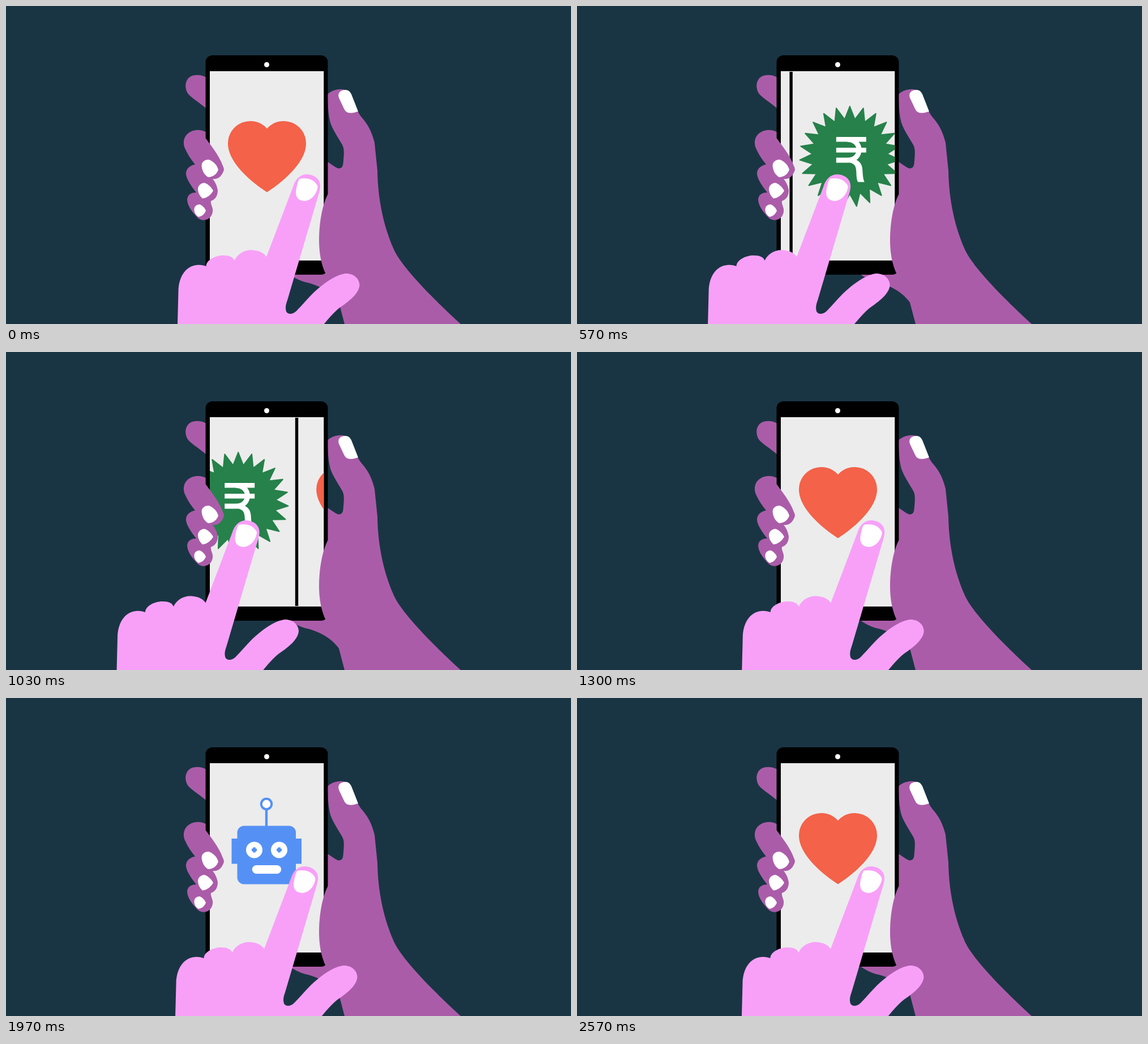
These frames come from a looping animation (998 px wide and 561 px high, 2640 ms). An HTML page:

```html
<!DOCTYPE html>
<html lang="en">
<head>
<meta charset="utf-8">
<title>Swiping a phone</title>
<style>
  html, body { margin: 0; width: 100%; height: 100%; overflow: hidden; background: #193543; }
  svg { display: block; width: 100vw; height: 100vh; }
  .skin { fill: #ab5ca9; }
  .nail { fill: #fff; }
</style>
</head>
<body>
<svg viewBox="0 0 998 561" preserveAspectRatio="none">
  <defs>
    <clipPath id="screen"><rect x="360" y="115" width="201.3" height="334"/></clipPath>

    <path id="heart" fill="#f36249" d="M461 216.2A39.5 39.5 0 0 1 530 242.5C530 274 494 307 461 328.5C428 307 392 274 392 242.5A39.5 39.5 0 0 1 461 216.2Z"/>

    <g id="rupee">
      <path id="burst" fill="#26814a" stroke="#26814a" stroke-width="2" stroke-linejoin="round"/>
      <path fill="#fff" d="M437 231H490V239.5H437ZM437 250H490V258.5H437Z"/>
      <path fill="none" stroke="#fff" stroke-width="9" d="M457 235.5C484 235.5 484 272 457 272H437"/>
      <path fill="#fff" d="M455 276C469 276 472 282 472.5 292C472.7 303 473.5 307 475.5 310.5H487C484.5 306 484 298 483.5 290C483 279 479 273 467 269Z"/>
    </g>

    <g id="robot" fill="#5591f5">
      <rect x="398.5" y="248" width="123.5" height="44.5"/>
      <rect x="408.5" y="225.5" width="103.5" height="103" rx="12"/>
      <rect x="457.8" y="195" width="4.4" height="32"/>
      <circle cx="460" cy="187" r="9.2" fill="#fff" stroke="#5591f5" stroke-width="4"/>
      <g id="eye">
        <circle cx="438.5" cy="268" r="14.5" fill="#fff"/>
        <path d="M436.2 263.5h4.6v2.2h2.2v4.6h-2.2v2.2h-4.6v-2.2h-2.2v-4.6h2.2z"/>
      </g>
      <use href="#eye" x="44"/>
      <rect x="434.7" y="295" width="51.5" height="15" rx="7.5" fill="#fff"/>
    </g>
  </defs>

  <rect width="998" height="561" fill="#193543"/>

  <!-- holding hand, behind the phone -->
  <g class="skin">
    <path d="M354 126C345 121 333 120 325 125C316 131 315 144 321 154C326 161 340 169 354 181Z"/>
    <path d="M568 156C573 150 585 146 594 147C604 148 609 154 612 162L622 187C626 195 631 199 635 205C644 217 648 230 651 241L656 290C657 345 668 390 684 427C695 455 745 508 803 561H598L588 523C572 501 547 491 528 487C518 484 510 480 500 473H540V262L568 275C575 279 580 284 587 286.5C593 287 595 283 595.5 278C597 262 598 252 594 245C586 231 577 218 573 206C569 190 569 178 568 165Z"/>
  </g>
  <path class="nail" d="M588 162C585 153 591 148 600 148C605 148 609 152 611 158L622 186C616 188 612 189 606 188.5C600 188 598 183 596 179Z"/>

  <!-- phone -->
  <rect x="352.5" y="87" width="216" height="387" rx="12"/>
  <circle cx="460.5" cy="103.5" r="4.5" fill="#fff"/>
  <g clip-path="url(#screen)">
    <rect x="360" y="115" width="202" height="334" fill="#ececec"/>
    <g id="track"></g>
  </g>

  <!-- holding hand, in front of the phone -->
  <g class="skin">
    <path d="M568.5 332C558 352 553 385 553 412C553 440 558 457 563 469L570 480H620V332Z"/>
    <path d="M352.5 222C346 218 333 217 324 223C314 229 311 242 317 253C321 262 327 271 334 279.5C326 281 319 286 318 294C317 303 327 318 336 329C328 329 321 332 320 341C320 352 329 363 336 371C341 377 347 379 353 377C362 375 366 366 365 358C364 353 361 348 362 344C370 341 374 335 374 325C372 315 369 310 365 305C372 306 379 303 383 294C385 290 386 288 383 282C376 263 362 246 352.5 233Z"/>
  </g>
  <g class="nail">
    <path d="M345.5 281C346 274 352 271 358 271C367 274 373 281 375 289C372 297 365 302 357 302C350 298 346 290 345.5 281Z"/>
    <path d="M339 322C340 315 346 312 351 312C358 315 363 320 366 326C362 333 355 339 347 339.5C342 335 339 329 339 322Z"/>
    <path d="M332.5 358C333 353 337 350 342 350C347 352 351 356 353 361C351 367 346 371 340 372C335 369 332 364 332.5 358Z"/>
  </g>

  <!-- swiping hand -->
  <g id="hand">
    <path fill="#f8a0f8" d="M303 562L304.5 503C305 478 317 459 337 457C345 456 349 458 353.5 459C353.5 448 370 440 384 440C395 440 401 443 403.5 449C408 438 421 430 434 430.5C447 431 456 436 460 442.5L507 319C511 305 520 297 532 297C547 298 556 307 555 320C554 329 550 339 547 350L497 519C494 527 493 533 495 539C498 545 507 544 513 538C523 528 531 518 541 508C556 494 577 476 599 472C613 471 624 480 624.5 492C624 505 611 517 594 529C583 536 572 549 561 562Z"/>
    <path class="nail" d="M518 305C530 302 545 305 550.5 318C550 328 542 343 527 344C516 343 512 338 512 328C513 319 515 311 518 305Z"/>
  </g>
</svg>

<script>
const LOOP = 2640, STEP = 1000 / 15, STEPS = 40;
const PAGE = 207, REACH = 119.5;
const slides = ['heart', 'rupee', 'heart', 'robot', 'heart'];

// Times in steps: finger arrives left, finger leaves left, page starts to slide
const swipes = [
  { arrive: 7.02, leave: 7.39, slide: 6 },
  { arrive: 16.81, leave: 17.05, slide: 15 },
  { arrive: 26.25, leave: 26.73, slide: 24 },
  { arrive: 35.8, leave: 36.06, slide: 33 }
];

const $ = id => document.getElementById(id);
const sine = p => (1 - Math.cos(Math.PI * p)) / 2;
const part = (t, start, span) => Math.min(1, Math.max(0, (t - start) / span));

function burstPath(points, outer, inner) {
  let d = '';
  for (let i = 0; i < points * 2; i++) {
    const a = Math.PI * i / points, r = i % 2 ? inner : outer;
    d += (i ? 'L' : 'M') + (461 + r * Math.sin(a)).toFixed(2) + ' ' + (265.5 - r * Math.cos(a)).toFixed(2);
  }
  return d + 'Z';
}

function build() {
  $('burst').setAttribute('d', burstPath(23, 88.5, 66));
  $('track').innerHTML = slides.map((name, i) =>
    `<use href="#${name}" x="${i * PAGE}"/>` +
    `<rect x="${561.6 + i * PAGE}" y="116" width="5.4" height="332"/>`).join('');
}

function draw(ms) {
  const k = Math.min(STEPS - 1, Math.floor((ms % LOOP + 36.7) / STEP));
  let hand = 0, page = 0;
  for (const s of swipes) {
    hand += sine(part(k, s.arrive - 5, 5) ** 1.3) - sine(part(k, s.leave, 3.7));
    page += sine(part(k, s.slide, 4) ** 0.8);
  }
  $('hand').setAttribute('transform', `translate(${(-REACH * hand).toFixed(2)} 0)`);
  $('track').setAttribute('transform', `translate(${(-PAGE * page).toFixed(2)} 0)`);
}

build();
const begin = performance.now();
function tick() {
  draw(performance.now() - begin);
  requestAnimationFrame(tick);
}
tick();
</script>
</body>
</html>
```
